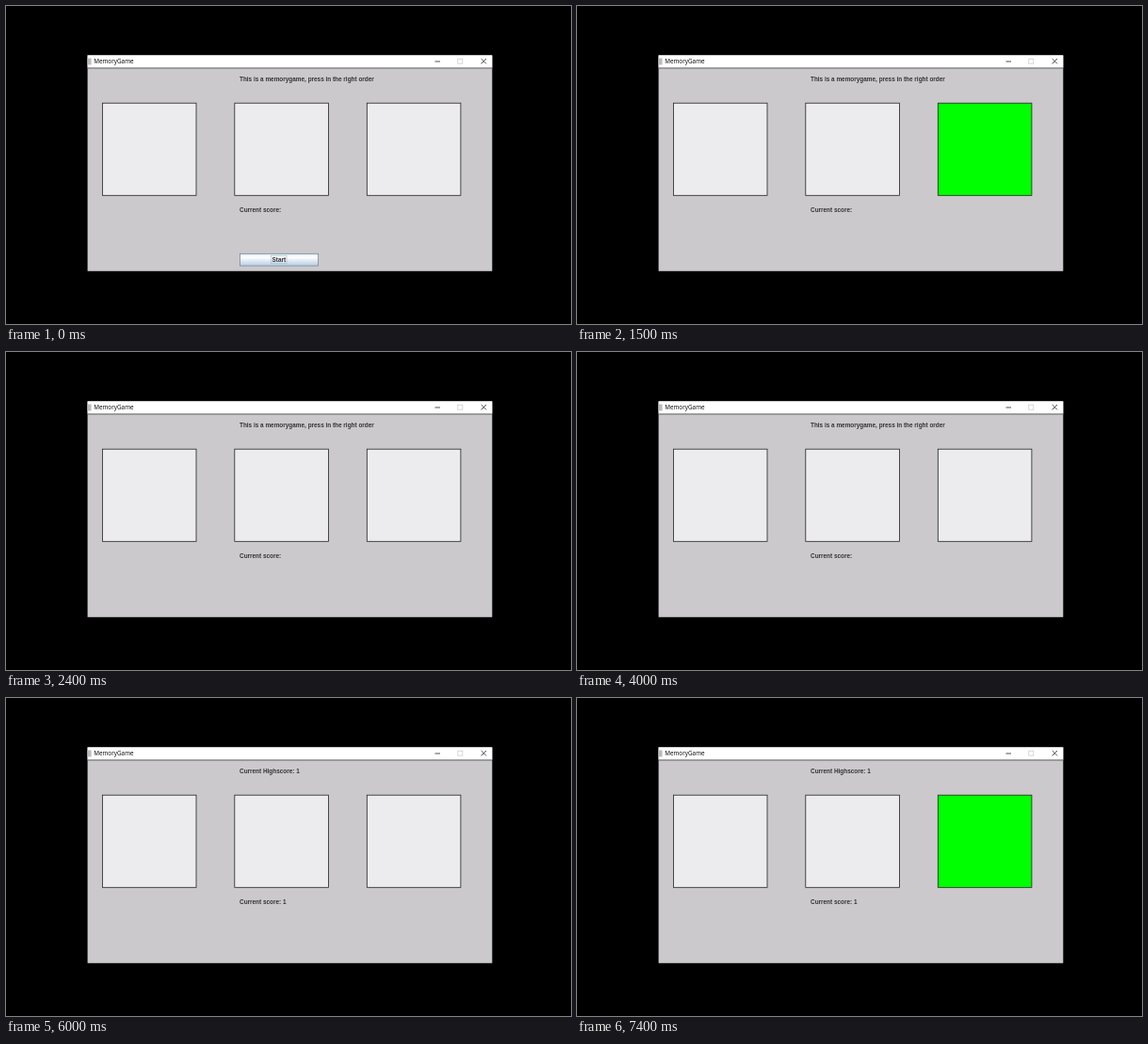
An HTML page that plays this animation: 600x338 px, repeating every 8000 ms.

```html
<!DOCTYPE html>
<html lang="en">
<head>
<meta charset="utf-8">
<title>MemoryGame</title>
<style>
  html, body { margin: 0; width: 100%; height: 100%; overflow: hidden; background: #000; }
  svg { display: block; width: 100%; height: 100%; }
  text { font: bold 6.42px "Liberation Sans", Arial, sans-serif; fill: #333; }
  .title { font: 6.35px "Open Sans", "Noto Sans", sans-serif; fill: #000; }
  .tile { fill: #ecebee; stroke: #222; stroke-width: .8; }
  .tile.lit { fill: #0f0; }
  .icon { fill: none; stroke: #222; stroke-width: .8; }
</style>
</head>
<body>
<svg viewBox="0 0 600 338">
  <defs>
    <linearGradient id="metal" x2="0" y2="1">
      <stop stop-color="#dde8f3"/>
      <stop offset=".3" stop-color="#fff"/>
      <stop offset=".6" stop-color="#dde8f3"/>
      <stop offset="1" stop-color="#b8cfe5"/>
    </linearGradient>
  </defs>
  <rect x="86.6" y="52.4" width="429.7" height="229.4" fill="#cbc9cc"/>
  <rect x="86.6" y="52.4" width="429.7" height="13.2" fill="#fff"/>
  <path d="M86.6 66H516.3" stroke="#444" stroke-width=".8"/>
  <rect x="86.6" y="55.5" width="4" height="7" fill="#bbb"/>
  <text class="title" x="93.2" y="60.9">MemoryGame</text>
  <path class="icon" d="M455.5 59H461M504.6 56l5.4 5.4m0-5.4l-5.4 5.4"/>
  <rect class="icon" x="479.8" y="56.2" width="5" height="5" style="stroke:#ccc"/>

  <text id="top" x="248" y="80"></text>
  <rect class="tile" x="102.4" y="103.2" width="99.6" height="98.1"/>
  <rect class="tile" x="242.8" y="103.2" width="99.6" height="98.1"/>
  <rect class="tile" id="third" x="383.3" y="103.2" width="99.6" height="98.1"/>
  <text id="score" x="248" y="218.5"></text>

  <g id="button">
    <rect x="248.4" y="263.3" width="83.2" height="12.8" fill="url(#metal)" stroke="#7a8a99" stroke-width=".8"/>
    <rect id="focus" x="281.4" y="265.2" width="16.6" height="8.6" fill="none" stroke="#a3b8cc" stroke-width=".6"/>
    <text x="289.8" y="271.8" text-anchor="middle">Start</text>
  </g>
</svg>
<script>
  const $ = id => document.getElementById(id);
  const within = (t, from, to) => t >= from && t < to;
  const show = (id, on) => $(id).setAttribute("visibility", on ? "visible" : "hidden");

  function draw(now) {
    const t = now % 8000;
    const scored = t >= 4600;

    $("top").textContent = scored ? "Current Highscore: 1" : "This is a memorygame, press in the right order";
    $("score").textContent = scored ? "Current score: 1" : "Current score:";
    $("third").classList.toggle("lit", within(t, 1500, 2400) || t >= 7400);
    show("button", t < 100 || within(t, 4600, 6000));
    show("focus", t < 100);
    requestAnimationFrame(draw);
  }
  draw(0);
</script>
</body>
</html>
```
